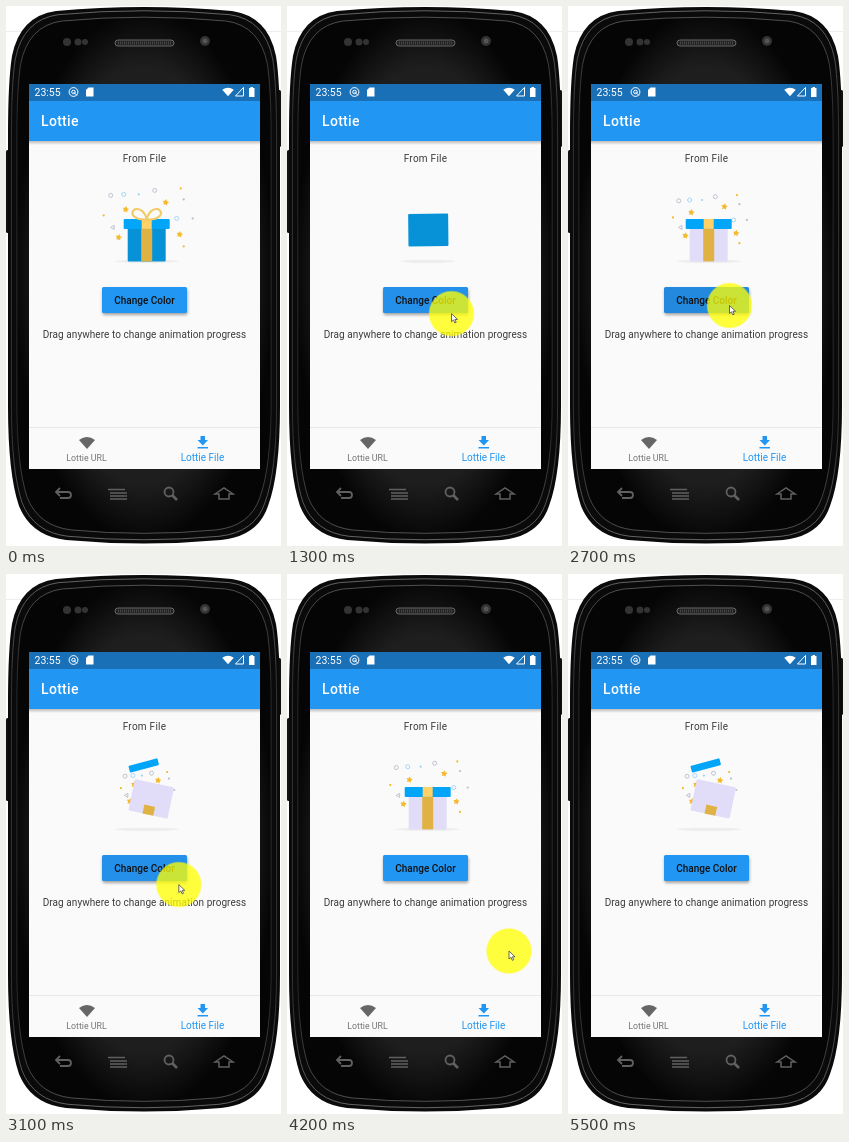
An HTML page that plays this animation: 275 px wide and 540 px high, repeating every 5.6 s.

```html
<!DOCTYPE html>
<html lang="en">
<head>
<meta charset="utf-8">
<style>
html, body { margin: 0; width: 100%; height: 100%; overflow: hidden; background: #fff; }
svg { display: block; width: 275px; height: 540px; }
text { font-family: Roboto, Arial, sans-serif; }
</style>
</head>
<body>
<svg viewBox="0 0 275 540">
  <defs>
    <path id="shell" d="M50 5Q138-3 226 5Q262 10 270 50Q274 75 274 130V400Q274 468 262 500Q252 530 215 534Q138 541 60 534Q25 530 13 500Q2 468 2 400V130Q2 75 6 50Q14 10 50 5Z"/>
    <radialGradient id="face" r=".56">
      <stop offset=".72" stop-color="#1e1e1e"/><stop offset=".92" stop-color="#050505"/>
    </radialGradient>
    <linearGradient id="edge" x2="0" y2="1">
      <stop stop-color="#666"/><stop offset=".2" stop-color="#333"/>
      <stop offset=".8" stop-color="#333"/><stop offset="1" stop-color="#666"/>
    </linearGradient>
    <linearGradient id="drop" x2="0" y2="1">
      <stop stop-opacity=".25"/><stop offset="1" stop-opacity="0"/>
    </linearGradient>
    <filter id="blur" x="-20%" y="-50%" width="140%" height="200%"><feGaussianBlur stdDeviation="1.5"/></filter>
    <radialGradient id="glow"><stop offset=".93" stop-color="#ff0"/><stop offset="1" stop-color="#ff0" stop-opacity="0"/></radialGradient>
    <path id="fan" d="M0 6L-8-3Q0-9 8-3Z"/>
  </defs>

  <!-- phone -->
  <path d="M0 25.500H275" stroke="#eee"/>
  <rect y="144" width="5" height="83" rx="1.500" fill="#111"/>
  <rect x="270" y="84" width="5" height="57" rx="1.500" fill="#111"/>
  <use href="#shell" fill="#0a0a0a"/>
  <g transform="translate(138 269)" stroke="url(#edge)">
    <use href="#shell" transform="scale(.975 .986) translate(-138 -269)" fill="none"/>
    <use href="#shell" transform="scale(.935 .962) translate(-138 -269)" fill="url(#face)" stroke-width=".8"/>
  </g>
  <g fill="#333">
    <circle cx="61" cy="36" r="4"/><circle cx="72" cy="36" r="3.500"/><circle cx="79" cy="36" r="3"/>
    <circle cx="199" cy="35" r="5"/><circle cx="199" cy="35" r="2.500" fill="#555"/>
  </g>
  <rect x="109" y="34" width="59" height="6" rx="3" fill="#222" stroke="#666"/>
  <path d="M112 37H166" stroke="#444" stroke-width="3" stroke-dasharray="1 1"/>
  <g fill="none" stroke="#606060" stroke-width="1.800">
    <path d="M51 486H62Q65 486 65 489T62 492H54M54 482L50 486L54 490"/>
    <path d="M102 483.500H119M104 487H121M104 490H121M104 493H121" stroke-width="1.300"/>
    <circle cx="163" cy="486" r="4.500"/><path d="M166 489L171 494" stroke-width="2.600"/>
    <path d="M209 488L218 482L227 488H223V493H213V488Z" stroke-width="1.500"/>
  </g>

  <!-- screen -->
  <rect x="23" y="78" width="231" height="385" fill="#fafafa"/>
  <rect x="23" y="135" width="231" height="4" fill="url(#drop)"/>
  <rect x="23" y="95" width="231" height="40" fill="#2196f3"/>
  <rect x="23" y="78" width="231" height="17" fill="#1a70b7"/>
  <g fill="#fff">
    <text x="28.500" y="90" font-size="10.500">23:55</text>
    <text x="35" y="120" font-size="14" font-weight="500" letter-spacing=".3">Lottie</text>
    <g fill="none" stroke="#fff">
      <circle cx="67.500" cy="86" r="4.400"/><circle cx="67.500" cy="86" r="1.800"/><path d="M67.500 86L71 89.500"/>
    </g>
    <path d="M82.500 81.500H87.500V90.500H80V84Z"/>
    <use href="#fan" transform="translate(222 86) scale(.72)"/>
    <path d="M229.500 90L237.500 81.500V90Z" fill="none" stroke="#fff"/>
    <path d="M243 82H244.500V81H247V82H248.500V91H243Z"/>
  </g>
  <path d="M23 421.500H254" stroke="#e8e8e8"/>
  <use href="#fan" transform="translate(81 437)" fill="#666"/>
  <path d="M194.500 430H199V434H202L196.800 439.500L191.500 434H194.500ZM191.500 441H202V442.500H191.500Z" fill="#2196f3"/>
  <g text-anchor="middle" font-size="10">
    <text x="80.500" y="455" font-size="8.800" fill="#757575">Lottie URL</text>
    <text x="196.500" y="455" fill="#2196f3">Lottie File</text>
    <g fill="#3c3c3c">
      <text x="138.500" y="155.500" letter-spacing=".25">From File</text>
      <text x="138.500" y="331.500" letter-spacing=".06">Drag anywhere to change animation progress</text>
    </g>
    <rect x="96.500" y="283" width="85" height="26" rx="2" opacity=".35" filter="url(#blur)"/>
    <rect id="button" x="96" y="281" width="85" height="26" rx="1.500"/>
    <text x="138.500" y="298" font-weight="500" fill="#111">Change Color</text>
  </g>

  <!-- gift -->
  <g transform="translate(.7 -.6)">
    <ellipse id="shade" cx="140" cy="256" ry="1.700" fill="#ededed"/>
    <g id="confetti"></g>
    <g id="box"><rect id="body" rx="1"/><rect id="band" x="-5.500" width="11" fill="#e0b244"/></g>
    <g id="lid"><rect id="top" rx="1" fill="#03a5f8"/><rect id="knot" x="-5" width="10" fill="#ffd166"/></g>
    <path id="bow" d="M0 0C-12 1-18-6-12-10C-6-12-1-6 0 0C1-6 6-12 12-10C18-6 12 1 0 0Z" fill="none" stroke="#f2cb68" stroke-width="2.200"/>
  </g>

  <g id="pointer">
    <circle r="23.300" fill="url(#glow)" opacity=".76"/>
    <path d="M0 0V8L2 6.300L3.300 9.300L4.700 8.700L3.400 5.800H6Z" fill="#fff" stroke="#444" stroke-width=".8"/>
  </g>
</svg>
<script>
const LOOP = 5600, HALF = 1200, PEAK = 2230;
const $ = id => document.getElementById(id);
const set = (el, attrs) => { for (const k in attrs) el.setAttribute(k, attrs[k]); };

// Each row is [time, ...values].
const boxKeys = [[0, 140, 248, 34, 14, 0], [70, 139.5, 240, 38, 23, -6], [230, 138, 224, 40, 33, -9],
  [330, 144.5, 225.5, 40, 32, 12], [450, 140, 239.5, 38, 33, 0]];
const lidKeys = [[290, 136, 203, 8, 3, -30], [330, 137, 192, 30, 7, -15], [400, 139, 194, 40, 9, -6],
  [480, 140, 218.5, 46, 10, 0]];
const bandKeys = [[300, 0], [330, 9], [480, 33]];
const shadeKeys = [[0, 10], [70, 15], [230, 23], [330, 32]];
const spreadKeys = [[300, .52], [330, .6], [730, .83], [770, .87], [970, .98], [1030, 1]];
const bowKeys = [[780, 0], [920, 1]];
const pointerKeys = [[500, 300, 374], [600, 265, 373], [800, 208, 340], [1200, 165, 309], [1900, 161.5, 299.5],
  [3000, 161.5, 299.5], [3500, 218, 355], [4000, 225, 378], [4200, 222, 377], [4400, 224, 377], [4500, 240, 377]];

function sample(keys, t) {
  if (t <= keys[0][0]) return keys[0].slice(1);
  const i = keys.findIndex(k => k[0] > t);
  if (i < 0) return keys[keys.length - 1].slice(1);
  const a = keys[i - 1], b = keys[i], u = (t - a[0]) / (b[0] - a[0]);
  return a.slice(1).map((v, j) => v + (b[j + 1] - v) * u);
}

const star = 'M' + Array.from({ length: 10 }, (_, i) => {
  const r = i % 2 ? 1.8 : 3.4, a = i * Math.PI / 5 - 1.4;
  return (r * Math.cos(a)).toFixed(2) + ' ' + (r * Math.sin(a)).toFixed(2);
}).join('L') + 'Z';
const gold = '#f5b92e', sky = '#9bd3f5', grey = '#b9bdcc';
const pieces = [
  [104, 190, 'ring', grey], [117, 189, 'ring', sky], [148, 185, 'ring', grey], [170, 213, 'ring', sky],
  [159, 197, 'star', gold], [119, 204, 'star', gold], [112, 232, 'star', gold], [173, 229, 'star', gold],
  [106, 222, 'wedge', grey], [132, 189, 'dot', sky], [174, 183, 'dot', gold], [177, 194, 'dot', grey],
  [97, 210, 'dot', gold], [186, 213, 'dot', grey], [177, 241, 'dot', gold]
].map(([x, y, kind, color]) => {
  const round = kind === 'ring' || kind === 'dot';
  const el = document.createElementNS('http://www.w3.org/2000/svg', round ? 'circle' : 'path');
  if (round) set(el, { r: kind === 'ring' ? 2 : 1.1 });
  else set(el, { d: kind === 'star' ? star : 'M1.5-2L-2 0L1.5 2Z' });
  const solid = kind === 'star' || kind === 'dot';
  set(el, solid ? { fill: color } : { fill: 'none', stroke: color, 'stroke-width': .9 });
  $('confetti').append(el);
  return { el, x, y };
});

function place(group, rect, [x, y, w, h, turn]) {
  set(group, { transform: `translate(${x} ${y}) rotate(${turn})` });
  set(rect, { x: -w / 2, y: -h / 2, width: w, height: h });
}
const show = (el, on) => set(el, { visibility: on ? 'visible' : 'hidden' });

function draw(t) {
  // The gift plays forwards and backwards in turn.
  const cycle = (t - PEAK + 4 * HALF) % (2 * HALF);
  const p = Math.abs(HALF - cycle);

  const box = sample(boxKeys, p), band = sample(bandKeys, p)[0];
  place($('box'), $('body'), box);
  set($('body'), { fill: t < 2500 ? '#0792d8' : '#e1ddf8' });
  set($('band'), { y: box[3] / 2 - band, height: band });

  const lid = sample(lidKeys, p);
  place($('lid'), $('top'), lid);
  set($('knot'), { y: -lid[3] / 2, height: lid[3] });
  show($('lid'), p > 290);
  show($('knot'), p > 400);

  const bow = sample(bowKeys, p)[0];
  set($('bow'), { transform: `translate(140 214) scale(${bow})` });
  show($('bow'), bow > 0);
  set($('shade'), { rx: sample(shadeKeys, p)[0] });

  const spread = sample(spreadKeys, p)[0];
  for (const { el, x, y } of pieces)
    set(el, { transform: `translate(${140 + (x - 140) * spread} ${222 + (y - 222) * spread})` });
  show($('confetti'), p > 300);

  const pressed = t >= 2500 && t < 2900, hover = t >= 1100 && t < 3200;
  set($('button'), { fill: pressed ? '#2389de' : hover ? '#2590ea' : '#2196f3' });
  set($('pointer'), { transform: `translate(${sample(pointerKeys, t)})` });
  show($('pointer'), t >= 500 && t < 4600);
}

const start = performance.now();
function frame() {
  const t = (performance.now() - start) % LOOP;
  draw(Math.floor(t / 100) * 100);
  requestAnimationFrame(frame);
}
frame();
</script>
</body>
</html>
```
